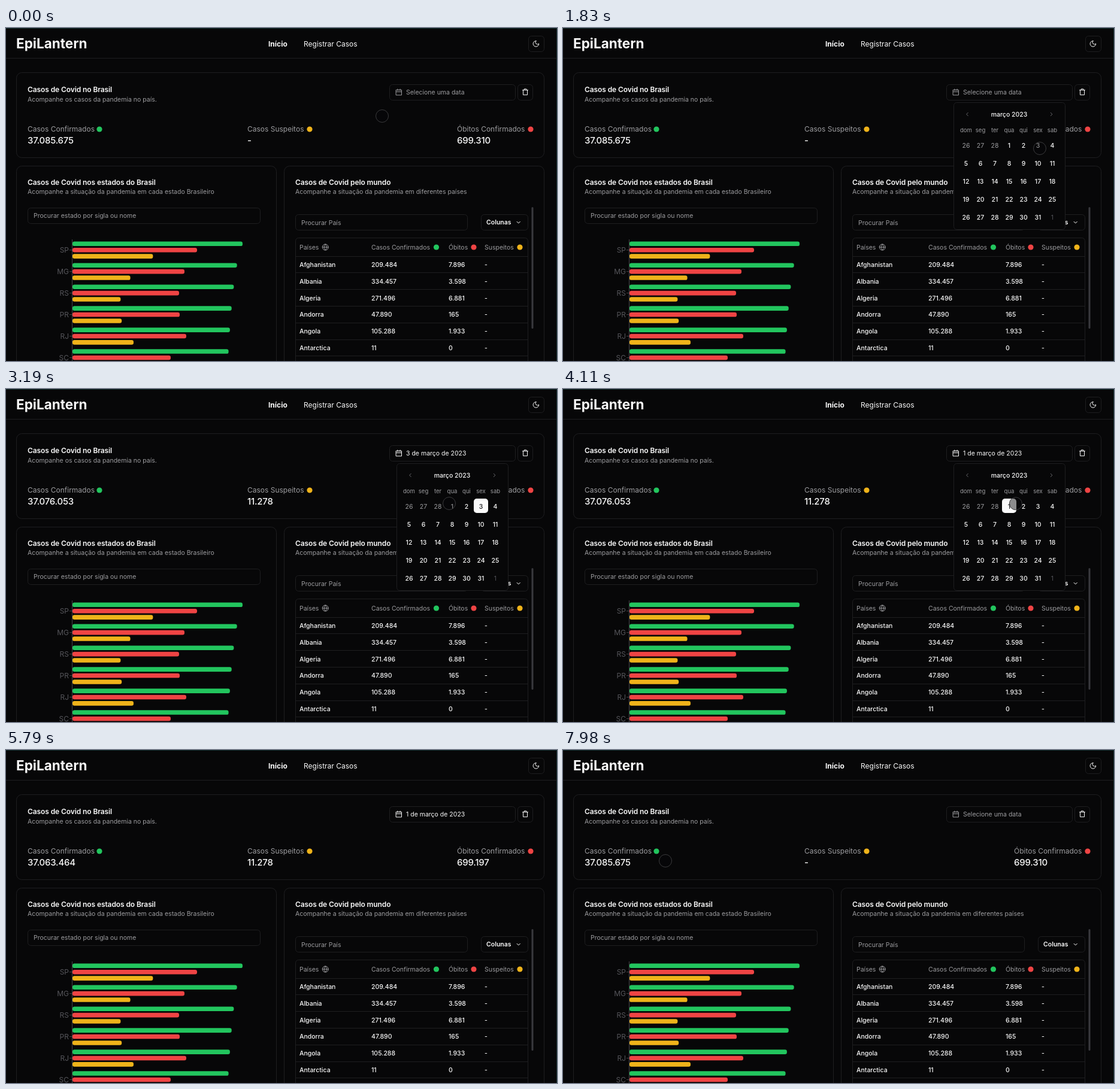
Recreate the animation shown at these times as an HTML page. Size 920x556 px, loop 8000 ms.

```html
<!DOCTYPE html>
<html lang="pt-BR">
<head>
<meta charset="utf-8">
<title>EpiLantern</title>
<style>
  html, body { margin: 0; width: 100%; height: 100%; overflow: hidden; background: #070708; }
  svg { display: block; width: 920px; height: 556px; font: 10.5px Inter, sans-serif; }
  text { fill: #fafafa; white-space: pre; }
  .muted { fill: #9c9c9f; }
  .dim { fill: #55555a; }
  .medium { font-weight: 500; }
  .semibold { font-weight: 600; }
  .logo { font-size: 22.5px; font-weight: 700; }
  .base { font-size: 12px; }
  .bold { font-weight: 700; }
  .title { font-size: 12px; font-weight: 600; letter-spacing: -.008em; }
  .figure { font-size: 15px; font-weight: 500; letter-spacing: -.015em; }
  .weekday { font-size: 9.6px; }
  .line { fill: none; stroke: #1e1e20; }
  .axis { fill: none; stroke: #444448; }
  .edge { fill: none; stroke: #112c2e; }
  .icon { fill: none; stroke: #fafafa; stroke-linecap: round; stroke-linejoin: round; }
  .icon.soft { stroke: #9c9c9f; }
  .icon.faint { stroke: #66666a; }
</style>
</head>
<body>
<svg id="stage" viewBox="0 0 920 556"></svg>
<script>
const LOOP = 8000;
const GREEN = '#22c55e', RED = '#ef4444', AMBER = '#efb31a', PAGE = '#070708';
const stage = document.getElementById('stage');

function add(parent, tag, attrs, content) {
  const node = document.createElementNS('http://www.w3.org/2000/svg', tag);
  for (const key in attrs) node.setAttribute(key, attrs[key]);
  if (content !== undefined) node.textContent = content;
  parent.appendChild(node);
  return node;
}
const text = (x, y, content, cls = '', anchor = 'start', parent = stage) =>
  add(parent, 'text', { x, y, class: cls, 'text-anchor': anchor }, content);
const box = (x, y, width, height, rx = 5, parent = stage) =>
  add(parent, 'rect', { x: x + .5, y: y + .5, width, height, rx, class: 'line' });
const path = (d, cls = 'icon', parent = stage) => add(parent, 'path', { d, class: cls });
const dot = (cx, cy, fill) => add(stage, 'circle', { cx, cy, r: 4.6, fill });

function card(x, y, width, height, title, subtitle) {
  box(x, y, width, height, 9);
  text(x + 19, y + (y < 200 ? 33 : 32), title, 'title');
  text(x + 19, y + (y < 200 ? 49 : 47), subtitle, 'muted');
}

// Header
path('M0 .5H919.5V556', 'edge');
path('M0 50.5H920', 'line');
text(17, 34, 'EpiLantern', 'logo');
text(438, 31, 'Início', 'base bold');
text(497, 31, 'Registrar Casos', 'base');
box(872, 13, 26, 26);
path('M885 21.5a3.3 3.3 0 0 0 4.7 4.7A4.8 4.8 0 1 1 885 21.5');

// Summary card
card(17, 74, 881, 142, 'Casos de Covid no Brasil', 'Acompanhe os casos da pandemia no país.');
box(640, 94, 210, 26);
const dateIcon = path('M651.5 103.5h9v8.5h-9zM651.5 106.5h9M654 101.8v2.6M658 101.8v2.6');
const dateText = text(668, 111, '');
box(854, 94, 25, 26);
path('M862.5 103.7h9M863.5 103.7v8h7v-8M865.2 103.5v-1.7h3.6v1.7');
const figures = [
  [36, 'Casos Confirmados', 156, GREEN],
  [403, 'Casos Suspeitos', 507, AMBER],
  [753, 'Óbitos Confirmados', 876, RED]
].map(([x, label, dotX, color]) => {
  text(x, 173, label, 'base muted');
  dot(dotX, 169, color);
  return text(x, 193, '', 'figure');
});

// States chart: confirmed cases fall off as a power law, suspects follow deaths
card(17, 230, 434, 400, 'Casos de Covid nos estados do Brasil',
  'Acompanhe a situação da pandemia em cada estado Brasileiro');
box(36, 300, 388, 26);
text(46, 317, 'Procurar estado por sigla ou nome', 'muted');
path('M110.5 353V556', 'axis');
const deaths = { SP: 208, MG: 187, RS: 178, PR: 179, RJ: 190, SC: 164 };
Object.entries(deaths).forEach(([name, length], row) => {
  const y = 360.3 + row * 35.95;
  const bars = [284 * (row + 1) ** -.048, length, 1.8 * length - 240];
  text(105, y + 14.8, name, 'base dim', 'end');
  path(`M106 ${y + 10.4}h4`, 'axis');
  bars.forEach((width, i) => add(stage, 'rect', {
    x: 111, y: y + i * 10.4 - 3.8, width, height: 7.6, rx: 3.2, fill: [GREEN, RED, AMBER][i]
  }));
});

// World table
card(464, 230, 434, 400, 'Casos de Covid pelo mundo',
  'Acompanhe a situação da pandemia em diferentes países');
box(483, 311, 287, 26);
text(493, 329, 'Procurar País', 'muted');
box(793, 311, 78, 26);
text(802, 328, 'Colunas', 'semibold');
path('M853 323.3l2.7 2.7 2.7-2.7');
add(stage, 'rect', { x: 877.5, y: 299, width: 3, height: 203, rx: 1.5, fill: '#3a3a3e' });
box(483, 350, 388, 260);
const columns = [490, 610, 739, 799];
['Países', 'Casos Confirmados', 'Óbitos', 'Suspeitos'].forEach((label, i) =>
  text(columns[i], 370, label, 'muted'));
path('M528.2 366a5 5 0 1 0 10 0a5 5 0 1 0-10 0h10M533.2 361q-4.4 5 0 10q4.4-5 0-10', 'icon soft');
dot(718.5, 366, GREEN);
dot(781, 366, RED);
dot(858, 366, AMBER);
[
  'Afghanistan 209.484 7.896', 'Albania 334.457 3.598', 'Algeria 271.496 6.881',
  'Andorra 47.890 165', 'Angola 105.288 1.933', 'Antarctica 11 0', ''
].forEach((line, row) => {
  const y = 399 + row * 27.8;
  path(`M483 ${Math.round(y - 18.5) + .5}H871`, 'line');
  `${line} -`.split(' ').forEach((cell, i) => text(columns[i], y, cell, 'medium'));
});

// Calendar popover
const popover = add(stage, 'g', {});
box(652, 124, 186, 212, 5, popover).style.fill = PAGE;
text(745, 147.5, 'março 2023', 'medium', 'middle', popover);
path('M676.3 141.3l-2.7 2.7 2.7 2.7M814.2 141.3l2.7 2.7-2.7 2.7', 'icon faint', popover);
const dayX = i => 673 + (i % 7) * 24;
['dom', 'seg', 'ter', 'qua', 'qui', 'sex', 'sab'].forEach((name, i) =>
  text(dayX(i), 174, name, 'weekday muted', 'middle', popover));
const chosen = add(popover, 'rect', { y: 183, width: 24, height: 24, rx: 5, fill: '#fafafa' });
const days = Array.from({ length: 35 }, (_, i) => {
  const day = i < 3 ? 26 + i : i < 34 ? i - 2 : 1;
  const style = i < 3 ? 'muted' : i < 34 ? 'medium' : 'dim';
  return text(dayX(i), 199.7 + Math.floor(i / 7) * 30, day, style, 'middle', popover);
});

// Pointer
const glow = add(add(stage, 'defs', {}), 'radialGradient', { id: 'press' });
['#e4707a', '#cf3a40', '#7c1418'].forEach((color, i) =>
  add(glow, 'stop', { offset: i / 2, 'stop-color': color }));
const pointer = add(stage, 'g', {});
const ring = add(pointer, 'circle', { r: 10.5, fill: 'rgba(7,7,8,.45)', stroke: '#3a3a3c' });
const press = add(pointer, 'circle', { r: 15, fill: 'url(#press)' });

// Pointer stops: arrival time and place; clicks add press, release and their outcome
const GLIDE = 200, REPLY = 340;
const latest = ['37.085.675', '-', '699.310'];
const stops = [
  { at: 0, to: [628, 147] },
  { at: 90, to: [732, 111], down: 620, up: 980, then: { open: 1 } },
  { at: 1320, to: [768, 175] },
  { at: 1830, to: [796, 201], down: 1870, up: 2190,
    then: { date: 3, totals: ['37.076.053', '11.278', '699.276'] } },
  { at: 3190, to: [740, 191], down: 3400, up: 3880,
    then: { date: 1, totals: ['37.063.464', '11.278', '699.197'] } },
  { at: 4240, to: [795, 192] },
  { at: 5200, to: [519, 192], down: 5250, up: 5400, then: { open: 0 } },
  { at: 5780, to: [940, 110] },
  { at: 6100, to: [867, 112], down: 6100, up: 6780, then: { date: 0, totals: latest } },
  { at: 7350, to: [770, 245] },
  { at: 7960, to: [171, 185] }
];
const clicks = stops.filter(stop => stop.then);

const ramp = (t, from, span) => Math.min(1, Math.max(0, (t - from) / span));
const outcome = t => Object.assign({ date: 0, totals: latest, open: 0 },
  ...clicks.filter(click => click.up <= t).map(click => click.then));

function pointerAt(t) {
  let [x, y] = stops[0].to;
  stops.slice(1).forEach(({ at, to }, i) => {
    const span = Math.min(GLIDE, at - stops[i].at);
    const k = ramp(t, at - span, span), ease = k * k * (3 - 2 * k);
    x += (to[0] - x) * ease;
    y += (to[1] - y) * ease;
  });
  return [x, y];
}

function draw(t) {
  const { date } = outcome(t);
  dateText.textContent = date ? `${date} de março de 2023` : 'Selecione uma data';
  dateText.setAttribute('class', date ? '' : 'muted');
  dateIcon.setAttribute('class', date ? 'icon' : 'icon soft');
  outcome(t - REPLY).totals.forEach((value, i) => { figures[i].textContent = value; });

  chosen.style.display = date ? '' : 'none';
  chosen.setAttribute('x', dayX(date + 2) - 12);
  days.forEach((day, i) => { day.style.fill = date && i === date + 2 ? '#18181b' : ''; });

  const open = clicks.reduce((value, { up, then }) =>
    'open' in then ? value + (then.open - value) * ramp(t, up, 140) : value, 0);
  popover.style.display = open ? '' : 'none';
  popover.setAttribute('opacity', open);
  popover.setAttribute('transform',
    `translate(745 124) scale(${.95 + .05 * open}) translate(-745 -124)`);

  const force = Math.max(...clicks.map(({ down, up }) =>
    ramp(t, down, 80) * (1 - ramp(t, up + 60, 160))));
  pointer.setAttribute('transform', `translate(${pointerAt(t)})`);
  press.setAttribute('r', 10.5 + 4.5 * Math.sqrt(force));
  press.setAttribute('opacity', force * .85);
  ring.setAttribute('opacity', 1 - force);
}

const start = performance.now();
function tick() {
  draw((performance.now() - start) % LOOP);
  requestAnimationFrame(tick);
}
tick();
</script>
</body>
</html>
```
